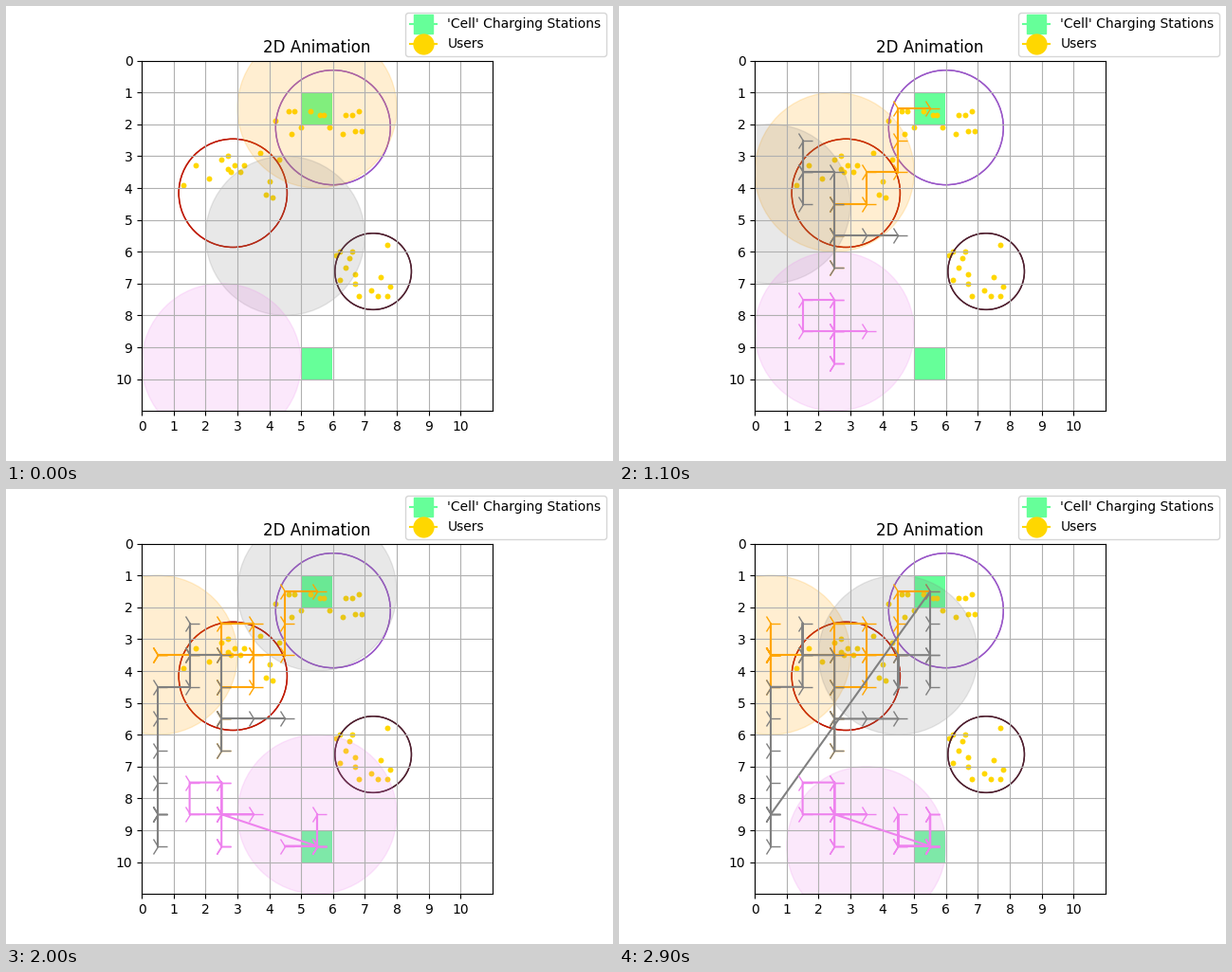
A matplotlib script for the animation above (3 s loop, 640 by 480 pixels).

```python
import random

import matplotlib.pyplot as plt
from matplotlib.animation import FuncAnimation
from matplotlib.lines import Line2D
from matplotlib.patches import Circle, Rectangle

STEPS = 30
STATION, USER = "#66ff99", "gold"
STEP = {"L": (-1, 0), "R": (1, 0), "U": (0, -1), "D": (0, 1), ".": (0, 0)}

# outline center, radius, color; middle and half extent of the user group
clusters = [
    ((6.0, 2.1), 1.8, "#9a58c8", (5.6, 1.95), (1.6, 0.45)),
    ((2.86, 4.16), 1.7, "#bf1800", (2.75, 3.65), (1.55, 0.85)),
    ((7.26, 6.62), 1.2, "#4f1f2f", (7.0, 6.55), (0.9, 0.95)),
]


def scatter_users(middle, extent, count=15):
    """Random users in a box, on a grid of tenths."""
    return [[round(m + rng.uniform(-e, e), 1) for m, e in zip(middle, extent)]
            for _ in range(count)]


def walk(start, moves, dock):
    """Positions after each move; J jumps to the dock."""
    path = [start]
    for move in moves:
        if move == "J":
            path.append(dock)
        else:
            (x, y), (dx, dy) = path[-1], STEP[move]
            path.append((x + dx, y + dy))
    return path


north, south = (5.5, 1.5), (5.5, 9.5)
drones = [
    ("orange", walk(north, "LDDLDLDDUUURULDLL...UDDU.....", north)),
    ("gray", walk((4.5, 5.5), "LLDUUULUDDLDDDDDU..JDDDULDUDU", north)),
    ("violet", walk((2.5, 9.5), "..UUDULDRRLJUDLR...UDUD..LUDL", south)),
]

fig, ax = plt.subplots(figsize=(6.4, 4.8), dpi=100)
ax.set_aspect("equal")
ax.set(xlim=(0, 11), ylim=(11, 0), xticks=range(11), yticks=range(11))
ax.set_title("2D Animation")
ax.grid(True)

for x, y in (north, south):
    ax.add_patch(Rectangle((x - 0.5, y - 0.5), 0.98, 1,
                           facecolor=STATION, linewidth=0))

rng = random.Random(4)
for center, radius, color, middle, extent in clusters:
    ax.scatter(*zip(*scatter_users(middle, extent)), s=18, color=USER,
               linewidths=0)
    for _ in range(2):  # doubled stroke for a crisp outline
        ax.add_patch(Circle(center, radius, fill=False, edgecolor=color))

ranges, trails = [], []
for color, path in drones:
    ranges.append(ax.add_patch(Circle(path[0], 2.5, color=color, alpha=0.18)))
    trails += ax.plot([], [], color=color, marker="4", markersize=15)

fig.legend(handles=[
    Line2D([0], [0], color=STATION, marker="s", markersize=15,
           label="'Cell' Charging Stations"),
    Line2D([0], [0], color=USER, marker="o", markersize=15, label="Users"),
], loc="upper right")


def update(step):
    for (_, path), area, trail in zip(drones, ranges, trails):
        area.center = path[step]
        past = path[:step]  # the trail lags one step behind
        trail.set_data([x for x, _ in past], [y for _, y in past])
    return ranges + trails


anim = FuncAnimation(fig, update, frames=STEPS, interval=100, repeat=True)
plt.show()
```
